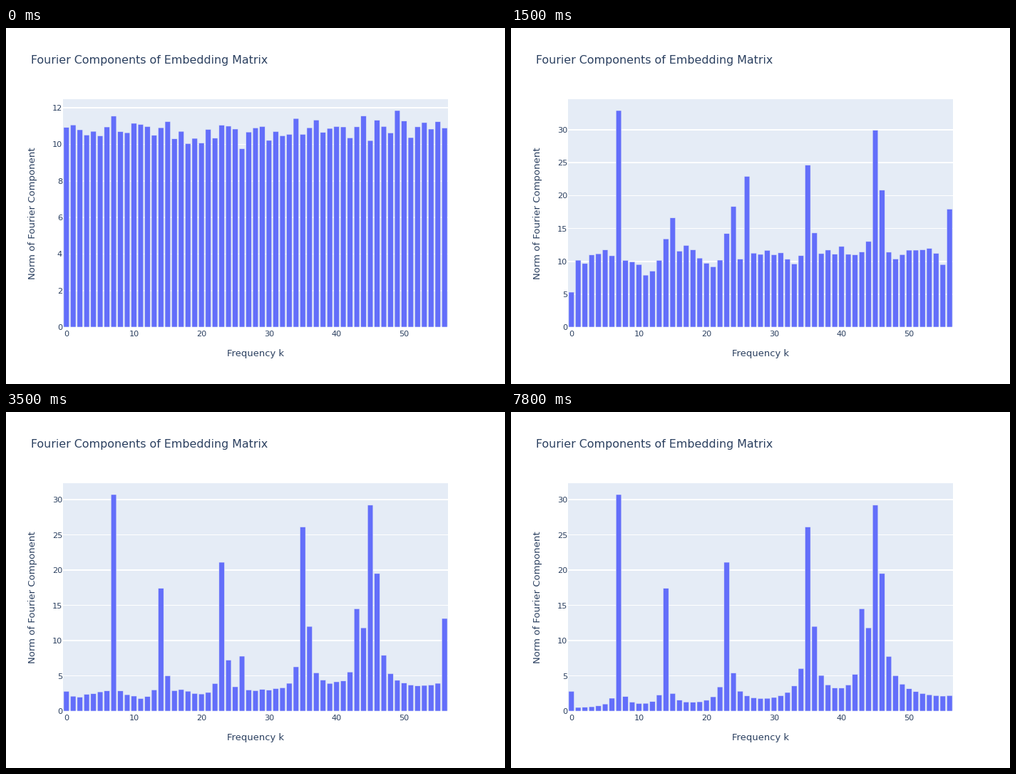
A matplotlib script for the animation above (8000 ms loop, 700 by 500 pixels).

```python
import numpy as np
import matplotlib.pyplot as plt
from matplotlib.animation import FuncAnimation
from matplotlib.patches import Rectangle

W, H, DPI = 700, 500, 100
LEFT, RIGHT, TOP, BASE = 80, 620, 100, 420
FRAMES, STEP = 80, 100
INK, PANEL, BAR = "#2a3f5f", "#e5ecf6", "#636efa"
N = 57
STEP_X = (RIGHT - LEFT) / N
k = np.arange(N)
rng = np.random.default_rng(7)

# Components that survive: norm at 0.5 s, at 1.5 s and when settled
strong = {0: (7.5, 5.3, 2.8), 7: (27.1, 32.9, 30.7), 14: (14.7, 13.4, 17.4),
          23: (14.4, 14.2, 21.1), 35: (18.6, 24.6, 26.1), 36: (15.2, 14.3, 12),
          43: (13, 11.4, 14.5), 44: (15, 13, 11.8), 45: (23.9, 29.9, 29.2),
          46: (18.5, 20.8, 19.5)}
# Components that stand out at 1.5 s and then fade
fading = {15: 16.4, 24: 17.5, 26: 22.8, 56: 17.8}

# Each bar ends as leakage from the peaks on its two sides, mirrored at the ends
peak = np.array([7.01, 14.01, 23.2, 35.26, 43.45, 45.4])
power = np.array([1.7, 2, 3.8, 7.15, 6, 11.5])
peak = np.r_[-peak[0], peak, 2 * N - 1 - peak[-1]]
power = np.r_[power[0], power, power[-1]]
right = np.searchsorted(peak, k)
leak = power[right - 1] / (k - peak[right - 1]) + power[right] / (peak[right] - k)
leak[list(strong)] = 0

# Everything else is noise that swells, then dies away, last at the high end
start = rng.normal(10.62, .45, N)
start *= 11.84 / start.max()
noise = 10.1 + 1.5 * np.cos(2 * np.pi * (k - 5) / 11.7) + rng.normal(0, .6, N)
for i, norm in fading.items():
    noise[i] = norm
edge = np.exp(k - N + 1.0)

times = np.array([0, .5, 1.5, 2.2, 3.5, 6, 7.8])
keys = np.array([
    np.sqrt(np.maximum(start ** 2 - leak ** 2, 1)),
    4.55 * np.sqrt(noise),
    noise,
    noise * (.48 + .016 * noise + .2 * edge),
    noise * (.1 + .01 * noise + .45 * edge),
    noise * (.01 + .07 * edge),
    noise * (.01 + .03 * edge)])
for i, (early, middle, final) in strong.items():
    turn = middle + .65 * (final - middle)
    keys[1:, i] = early, middle, turn, final, final, final

# Monotone cubic through the logarithms
logs = np.log(keys)
slope = np.diff(logs, axis=0) / np.diff(times)[:, None]
product = slope[:-1] * slope[1:]
steady = product > 0
total = np.where(steady, slope[:-1] + slope[1:], 1)
tangent = np.vstack([slope[:1], np.where(steady, 2 * product / total, 0),
                     slope[-1:]])


def norms_at(t):
    t = min(t, times[-1])
    j = min(np.searchsorted(times, t, side="right"), len(times) - 1) - 1
    span = times[j + 1] - times[j]
    u = (t - times[j]) / span
    ease = u * u * (3 - 2 * u)
    value = (logs[j] * (1 - ease) + logs[j + 1] * ease
             + span * u * (1 - u) * ((1 - u) * tangent[j] - u * tangent[j + 1]))
    return np.hypot(leak, np.exp(value))


plt.rcParams["font.family"] = "DejaVu Sans"
fig = plt.figure(figsize=(W / DPI, H / DPI), dpi=DPI, facecolor="white")
ax = fig.add_axes([0, 0, 1, 1])
ax.set(xlim=(0, W), ylim=(H, 0))
ax.axis("off")


def box(x, y, w, h, color, z, **kw):
    return ax.add_patch(Rectangle((x, y), w, h, facecolor=color, zorder=z, **kw))


def label(x, y, text, px, **kw):
    return ax.text(x, y, text, fontsize=px * 72 / DPI, color=INK,
                   va="baseline", **kw)


box(LEFT, TOP, RIGHT - LEFT, BASE - TOP, PANEL, 0, lw=0)
box(LEFT, BASE - 1, RIGHT - LEFT, 2, "white", 1, lw=0)
label(35, 50, "Fourier Components of Embedding Matrix", 15.93)
label(350, 461, "Frequency k", 13.1, ha="center")
label(41, 260, "Norm of Fourier Component", 13.25, ha="center",
      rotation=90, rotation_mode="anchor")
for n in range(0, N, 10):
    label(LEFT + (n + .5) * STEP_X, 433, str(n), 11.2, ha="center")

bars = [box(LEFT + (i + .1) * STEP_X, BASE, .8 * STEP_X, 0, BAR, 2,
            edgecolor=PANEL, lw=.5 * 72 / DPI, snap=False) for i in k]
grid = [box(LEFT, BASE, RIGHT - LEFT, 1, "white", 1, lw=0) for _ in range(11)]
ticks = [label(79, BASE, "", 11.2, ha="right") for _ in grid]


def draw(frame):
    norms = norms_at(frame * STEP / 1000)
    limit = norms.max() * 20 / 19
    scale = (BASE - TOP) / limit
    for bar, norm in zip(bars, norms):
        bar.set_y(BASE - norm * scale)
        bar.set_height(norm * scale)
    gap = 2 if limit <= 18 else 5
    for n, (line, tick) in enumerate(zip(grid, ticks)):
        value = n * gap
        shown = value <= limit
        y = BASE - value * scale
        line.set_visible(shown and n > 0)
        tick.set_visible(shown)
        line.set_y(np.floor(y))
        line.set_height(2 if y % 1 >= .5 else 1)
        tick.set_text(str(value))
        tick.set_y(y + 4.2)
    return bars + grid + ticks


anim = FuncAnimation(fig, draw, frames=FRAMES, interval=STEP,
                     repeat=True, repeat_delay=0, blit=False)
plt.show()
```
